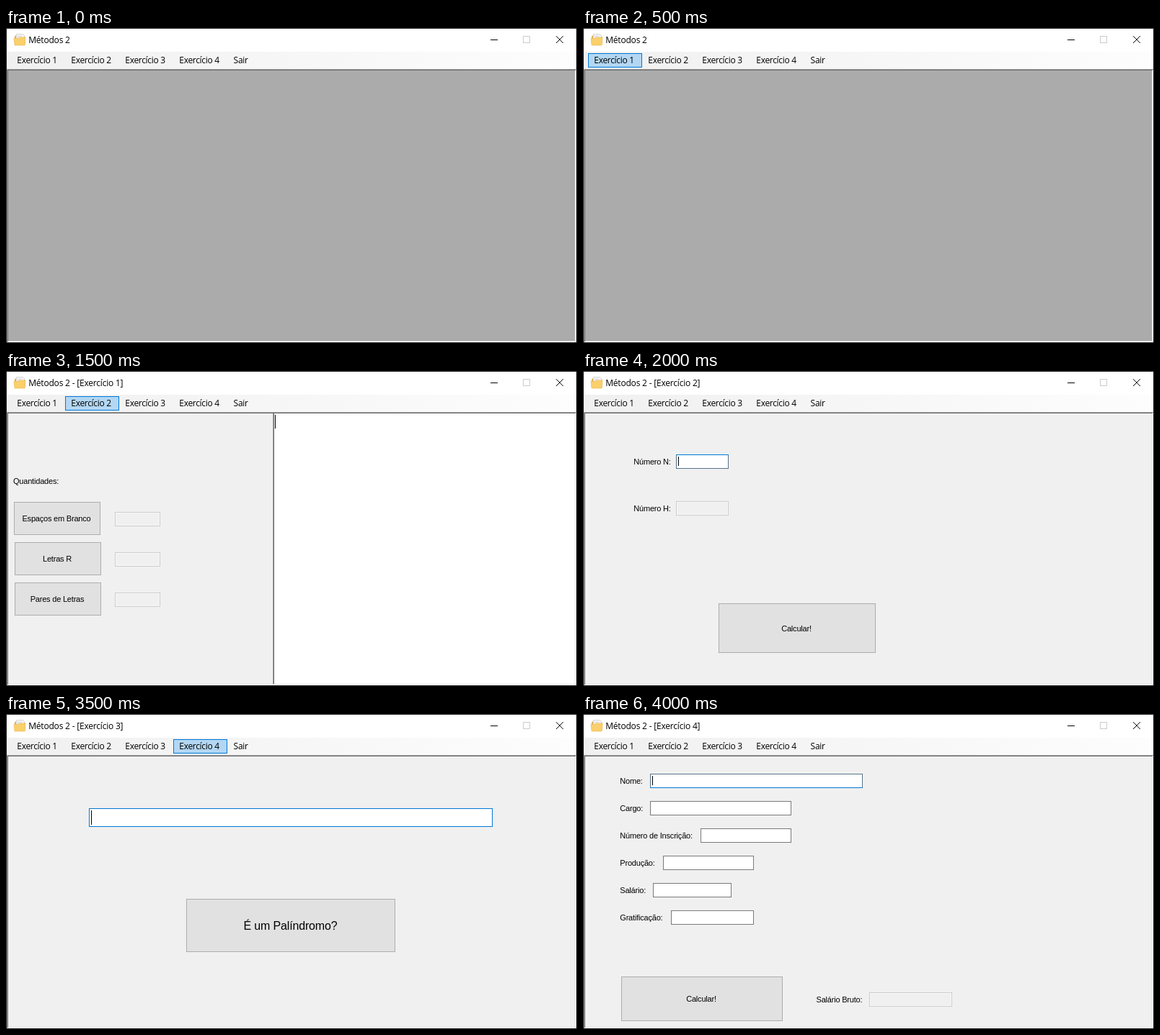
Animation, 792 px wide and 438 px high, one loop 4.5 s. Source, as an HTML page:

```html
<!DOCTYPE html>
<html lang="pt">
<head>
<meta charset="utf-8">
<title>Métodos 2</title>
<style>
  html, body { margin: 0; width: 100%; height: 100%; overflow: hidden; background: #fff; }
  svg { display: block; width: 792px; height: 438px; shape-rendering: crispEdges; }
  text { font: 11px "Liberation Sans", Arial, sans-serif; letter-spacing: -.2px; fill: #000; white-space: pre; }
  .ui, .ui text { font: 12px "Open Sans", "Noto Sans", sans-serif; letter-spacing: -.3px; }
  .title { letter-spacing: -.2px !important; }
  .mid { text-anchor: middle; }
  .big { font-size: 16px; letter-spacing: -.15px; }

  .button { fill: #e1e1e1; stroke: #adadad; }
  .field { fill: #fff; stroke: #7a7a7a; }
  .focus { fill: #fff; stroke: #0078d7; }
  .dim { stroke: #56728a; }
  .edge { stroke: #0078d7; }
  .off { fill: #f0f0f0; stroke: #ccc; }
  .halo { fill: none; stroke: #f9f9f9; }
  .hover { fill: #b3d7f3; stroke: #0078d7; }
  .panel { fill: #f0f0f0; }

  /* --at is the moment in the 4.5 s loop when a part appears */
  .long, .short { visibility: hidden; animation: long 4.5s step-end calc(var(--at) - 4.5s) infinite; }
  .short { animation-name: short; }
  @keyframes long { 0% { visibility: visible; } 22.2222%, 100% { visibility: hidden; } }
  @keyframes short { 0% { visibility: visible; } 11.1111%, 100% { visibility: hidden; } }
</style>
</head>
<body>
<svg viewBox="0 0 792 438">
  <defs>
    <linearGradient id="strip">
      <stop offset="0" stop-color="#f0f0f0"/>
      <stop offset="1" stop-color="#fdfdfd"/>
    </linearGradient>
  </defs>

  <!-- window -->
  <rect width="792" height="438" fill="#1b1b1b"/>
  <rect x="1" y="1" width="790" height="436" fill="#fff"/>
  <rect x="1" y="33" width="790" height="24" fill="url(#strip)"/>
  <rect x="3" y="59" width="786" height="376" fill="#ababab"/>

  <g shape-rendering="geometricPrecision">
    <path d="M12 22V11.5l1-1h3l1 1.5h9.500v10z" fill="#e5ac45"/>
    <path d="M13.500 19l1-10.500h9l2 2V19z" fill="#f3f3f3" stroke="#c9c9c9" stroke-width=".7"/>
    <path d="M16 11.500h6M16 13.500h7" stroke="#cfd4da" stroke-width=".8"/>
    <path d="M11 14.500h6l1.500-1.500h8.500l-.8 11H12z" fill="#fad06c" stroke="#e9b650" stroke-width=".6"/>
    <path d="M763 11.200l9.800 9.800M772.800 11.200L763 21" stroke="#000" fill="none"/>
  </g>
  <path d="M672 16.500h10" stroke="#000"/>
  <rect x="717.5" y="11.500" width="9" height="9" fill="none" stroke="#ccc"/>

  <!-- highlighted menu entries -->
  <g class="hover">
    <rect class="short" style="--at:.5s" x="7.500" y="35.500" width="74" height="19"/>
    <rect class="short" style="--at:1.5s" x="82.500" y="35.500" width="74" height="19"/>
    <rect class="short" style="--at:2.5s" x="157.500" y="35.500" width="74" height="19"/>
    <rect class="short" style="--at:3.5s" x="232.500" y="35.500" width="74" height="19"/>
  </g>
  <g class="ui">
    <text x="15.300" y="49">Exercício 1</text>
    <text x="90.300" y="49">Exercício 2</text>
    <text x="165.300" y="49">Exercício 3</text>
    <text x="240.300" y="49">Exercício 4</text>
    <text x="315.600" y="49">Sair</text>
  </g>

  <g class="long" style="--at:0s">
    <text class="ui title" x="31.200" y="21">Métodos 2</text>
  </g>

  <g class="long" style="--at:1s">
    <text class="ui title" x="31.200" y="21">Métodos 2 - [Exercício 1]</text>
    <rect class="panel" x="3" y="59" width="786" height="376"/>
    <rect x="372" y="59" width="417" height="376" fill="#fff"/>
    <path d="M370.500 59v376" stroke="#a0a0a0"/>
    <path d="M371.500 59v376" stroke="#696969"/>
    <path d="M373.500 61v19" stroke="#000"/>
    <text x="10" y="157">Quantidades:</text>
    <rect class="button" x="11.500" y="182.500" width="119" height="45"/>
    <rect class="button" x="12.500" y="238.500" width="119" height="45"/>
    <rect class="button" x="12.500" y="294.500" width="119" height="45"/>
    <text class="mid" x="70" y="209">Espaços em Branco</text>
    <text class="mid" x="71" y="265">Letras R</text>
    <text class="mid" x="71" y="321">Pares de Letras</text>
    <path class="off" d="M151.500 196.500h62v19h-62zM151.500 252.500h62v19h-62zM151.500 308.500h62v19h-62z"/>
    <path class="halo" d="M152.500 197.500h60v17h-60zM152.500 253.500h60v17h-60zM152.500 309.500h60v17h-60z"/>
  </g>

  <g class="long" style="--at:2s">
    <text class="ui title" x="31.200" y="21">Métodos 2 - [Exercício 2]</text>
    <rect class="panel" x="3" y="59" width="786" height="376"/>
    <text x="70.300" y="130">Número N:</text>
    <text x="70.300" y="195">Número H:</text>
    <rect class="focus dim" x="129.500" y="116.500" width="72" height="19"/>
    <path class="edge" d="M129 116.500h73"/>
    <path d="M132.500 119v13" stroke="#000"/>
    <rect class="off" x="129.500" y="181.500" width="72" height="19"/>
    <rect class="halo" x="130.500" y="182.500" width="70" height="17"/>
    <rect class="button" x="188.500" y="323.500" width="217" height="68"/>
    <text class="mid" x="296" y="362">Calcular!</text>
  </g>

  <g class="long" style="--at:3s">
    <text class="ui title" x="31.200" y="21">Métodos 2 - [Exercício 3]</text>
    <rect class="panel" x="3" y="59" width="786" height="376"/>
    <rect class="focus" x="115.500" y="131.500" width="559" height="25"/>
    <path d="M118.500 134v20" stroke="#000"/>
    <rect class="button" x="250.500" y="257.500" width="289" height="73"/>
    <text class="mid big" x="394.500" y="300">É um Palíndromo?</text>
  </g>

  <g class="short" style="--at:4s">
    <text class="ui title" x="31.200" y="21">Métodos 2 - [Exercício 4]</text>
    <rect class="panel" x="3" y="59" width="786" height="376"/>
    <text x="51.300" y="97">Nome:</text>
    <text x="51.300" y="135">Cargo:</text>
    <text x="51.300" y="173">Número de Inscrição:</text>
    <text x="51.300" y="211">Produção:</text>
    <text x="51.300" y="249">Salário:</text>
    <text x="51.300" y="287">Gratificação:</text>
    <rect class="focus dim" x="93.500" y="83.500" width="294" height="19"/>
    <path class="edge" d="M93 102.500h295"/>
    <path d="M96.500 86v13" stroke="#000"/>
    <rect class="field" x="93.500" y="121.500" width="195" height="19"/>
    <rect class="field" x="163.500" y="159.500" width="125" height="19"/>
    <rect class="field" x="111.500" y="197.500" width="125" height="19"/>
    <rect class="field" x="97.500" y="235.500" width="108" height="19"/>
    <rect class="field" x="122.500" y="273.500" width="114" height="19"/>
    <rect class="button" x="53.500" y="365.500" width="223" height="61"/>
    <text class="mid" x="164" y="400">Calcular!</text>
    <text x="323.500" y="401">Salário Bruto:</text>
    <rect class="off" x="397.500" y="387.500" width="114" height="19"/>
    <rect class="halo" x="398.500" y="388.500" width="112" height="17"/>
  </g>

  <!-- sunken client edge -->
  <g fill="none">
    <path d="M1.500 437V57.500H791" stroke="#a0a0a0"/>
    <path d="M2.500 436V58.500H790" stroke="#696969"/>
    <path d="M789.500 59V435.500H3" stroke="#e3e3e3"/>
    <path d="M790.500 58V436.500H2" stroke="#fff"/>
  </g>
</svg>
</body>
</html>
```
